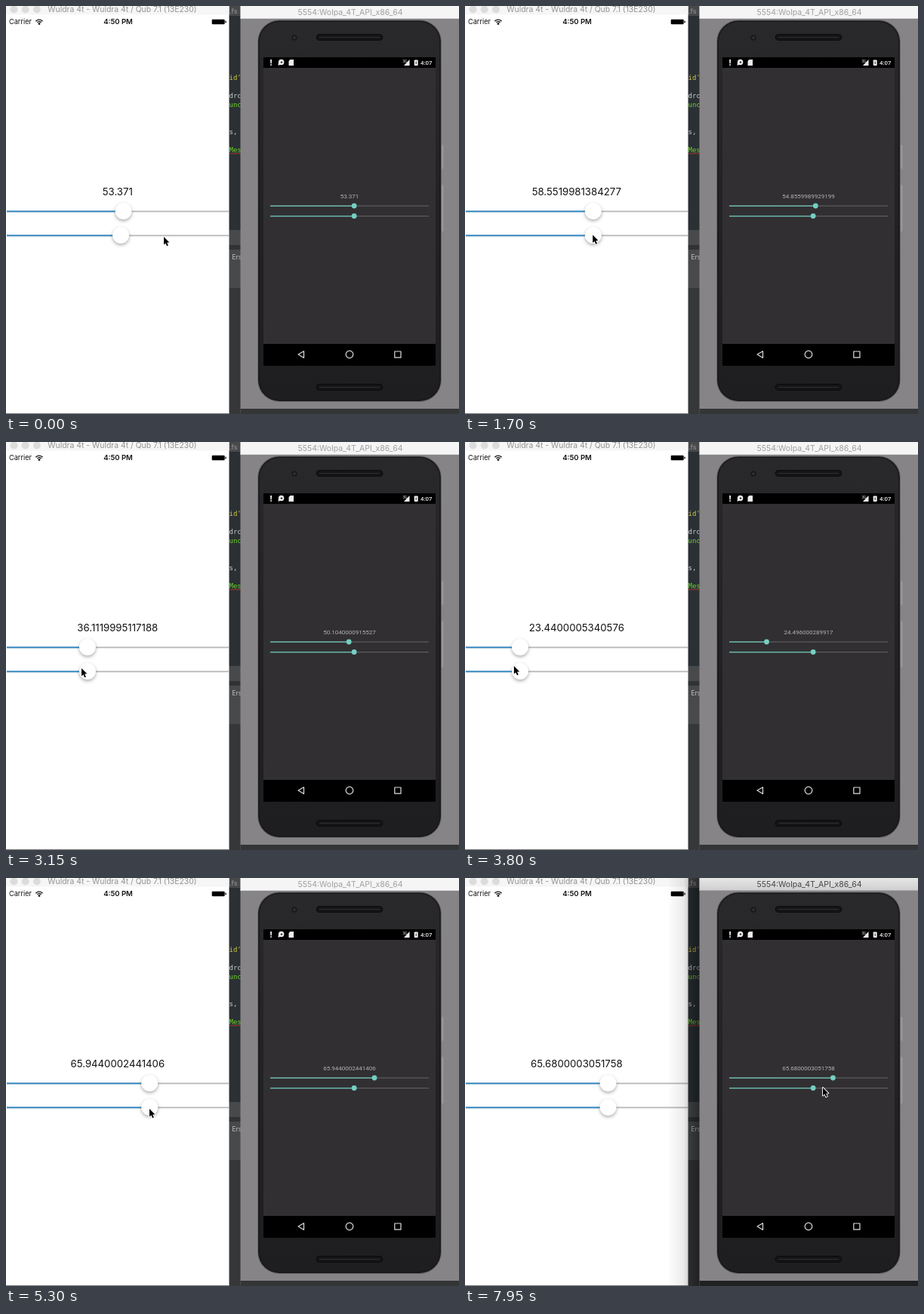
Animation of 600 by 541 pixels, one loop 8 s. Source, as an HTML page with a canvas:

```html
<!DOCTYPE html>
<html lang="en">
<head>
<meta charset="utf-8">
<title>Linked sliders</title>
<style>
html, body { margin: 0; width: 100%; height: 100%; overflow: hidden; background: #fff; }
canvas { display: block; width: 600px; height: 541px; }
</style>
</head>
<body>
<canvas id="stage" width="600" height="541"></canvas>
<script>
const ctx = document.getElementById('stage').getContext('2d');
const LOOP = 8000, STEP = 50, LAG = 134, GRAB = 1330, FOCUS = 6650;
const START = 53.371, REST = 65.68, NOTCH = 0.132;
const SANS = 'Inter, "Liberation Sans", sans-serif';
const ROBOTO = 'Roboto, sans-serif';
const MONO = '"DejaVu Sans Mono", monospace';

// Each stroke of the mouse eases everything to a new state.
const origin = { value: 52.1, x: 209, y: 306 };
const strokes = [
  { from: 0, to: 850, x: 150, y: 302 },
  { from: GRAB, to: 2427, value: 77.2, x: 225, y: 308 },
  { from: 2650, to: 3350, value: 26.6, x: 71, y: 298 },
  { from: 3350, to: 3880, value: 23.3, x: 64.5, y: 297 },
  { from: 4300, to: 5150, value: 65.944, x: 190, y: 306 },
  { from: 5800, to: 5950, value: REST },
  { from: 6000, to: 6950, x: 416, y: 278 },
  { from: 7150, to: 7950, x: 474 }
];

function ease(p) {
  return Math.sin(Math.min(1, Math.max(0, p)) * Math.PI / 2) ** 2;
}

function at(key, t) {
  return strokes.reduce((now, s) =>
    key in s ? now + (s[key] - now) * ease((t - s.from) / (s.to - s.from)) : now, origin[key]);
}

function valueAt(t) {
  if (t < GRAB) return START;
  const notches = Math.round((at('value', t) - REST) / NOTCH);
  return Math.fround(+(REST + notches * NOTCH).toFixed(3));
}

const label = v => String(Number(v.toPrecision(15)));

function rect(x, y, w, h, fill) {
  ctx.fillStyle = fill;
  ctx.fillRect(x, y, w, h);
}

function paint(fill, stroke, line = 1) {
  ctx.lineJoin = 'round';
  if (stroke) { ctx.strokeStyle = stroke; ctx.lineWidth = line; ctx.stroke(); }
  if (fill) { ctx.fillStyle = fill; ctx.fill(); }
}

function round(x, y, w, h, r, ...style) {
  ctx.beginPath();
  ctx.roundRect(x, y, w, h, r);
  paint(...style);
}

function disc(x, y, r, ...style) {
  ctx.beginPath();
  ctx.arc(x, y, r, 0, 7);
  paint(...style);
}

function poly(points, ...style) {
  ctx.beginPath();
  points.forEach(([x, y]) => ctx.lineTo(x, y));
  ctx.closePath();
  paint(...style);
}

function text(s, x, y, font, fill, align = 'left') {
  ctx.font = font;
  ctx.textAlign = align;
  ctx.fillStyle = fill;
  ctx.fillText(s, x, y);
}

function gradient(x0, y0, x1, y1, ...stops) {
  const g = ctx.createLinearGradient(x0, y0, x1, y1);
  stops.forEach((c, i) => g.addColorStop(i / (stops.length - 1), c));
  return g;
}

function lightSlider(v, y) {
  const x = 8.3 + 2.759 * v;
  rect(1, y - 0.5, 294, 1.8, '#b8b8b8');
  rect(1, y - 0.5, x - 1, 1.8, '#2b86c3');
  ctx.save();
  ctx.shadowColor = 'rgba(0,0,0,.32)';
  ctx.shadowBlur = 4;
  ctx.shadowOffsetY = 2;
  disc(x, y, 11, '#fff');
  ctx.restore();
}

function lightWindow(v, lower) {
  rect(0, 0, 295.5, 541, '#fff');
  rect(0, 0, 295.5, 11.5, '#f7f6f7');
  for (let i = 0; i < 3; i++) disc(10.5 + 15.2 * i, 4.5, 5, '#dcdcdc');
  text('Wuldra 4t - Wuldra 4t / Qub 7.1 (13E230)', 154, 8, '10.4px ' + SANS, '#929292', 'center');

  text('Carrier', 4, 24.3, '9.2px ' + SANS, '#111');
  for (let r = 3.4; r < 6; r += 2.5) {
    ctx.beginPath();
    ctx.arc(44, 24, r, -Math.PI * 0.78, -Math.PI * 0.22);
    paint(null, '#111', 1.4);
  }
  disc(44, 23.6, 1.4, '#111');
  text('4:50 PM', 148.5, 24.3, '600 9.5px ' + SANS, '#111', 'center');
  round(272.7, 17.7, 17, 6.6, 1.2, '#000');
  rect(290.4, 19.7, 1.3, 2.6, '#000');

  text(label(v), 147.8, 251, '13.2px ' + SANS, '#111', 'center');
  lightSlider(v, 272);
  lightSlider(lower, 304);
  rect(0, 540, 295.5, 1, '#777');
}

function editor() {
  rect(295, 0, 16, 541, '#2a3034');
  rect(295, 0, 16, 13, '#48494b');
  rect(295, 297, 16, 78, '#47494b');
  rect(295, 317, 16, 6, '#303234');
  rect(295, 374, 16, 167, '#363739');
  text('.fs', 296, 10, '9px ' + SANS, '#999');
  text("id'", 295.5, 98, '9px ' + MONO, '#d6c94a');
  text('drc', 295.5, 122, '9px ' + MONO, '#ccc');
  text('unc', 295.5, 134, '9px ' + MONO, '#6fd02f');
  text('s,', 295.5, 170, '9px ' + MONO, '#ccc');
  text('Mes', 295.5, 194, '9px ' + MONO, '#6fd02f');
  rect(296, 195.3, 15, 1, '#a8372d');
  text('Ers', 299.5, 335.5, '8.5px ' + SANS, '#c4c4c4');
}

function windowShadow() {
  rect(268, 0, 43, 541, gradient(268, 0, 311, 0, 'rgba(0,0,0,0)', 'rgba(0,0,0,.08)', 'rgba(0,0,0,.42)'));
}

function speaker(y) {
  round(411.5, y, 87, 7, 3.5, '#141415', '#050505', 1.5);
  rect(415, y + 3, 80, 1, '#303033');
}

function statusIcons() {
  const ink = '#eee';
  text('!', 349.5, 79, '900 11px ' + ROBOTO, ink);
  disc(364.6, 74.5, 3.7, ink);
  poly([[361, 74], [360.5, 79], [365, 77]], ink);
  disc(365, 74.6, 1.2, '#222');
  poly([[374.5, 73], [376.5, 71], [381, 71], [381, 79], [374.5, 79]], ink);
  text('3G', 525.5, 74.5, '4.5px ' + ROBOTO, ink);
  poly([[527, 79], [534.5, 79], [534.5, 71]], ink);
  round(540.7, 71.5, 5, 7.5, 0.8, ink);
  rect(542.7, 73.5, 1, 3.5, '#333');
  text('4:07', 549, 78, '500 7.8px ' + ROBOTO, ink);
}

function darkSlider(v, y) {
  const x = 347.2 + 2.135 * v;
  rect(350, y - 0.5, 210, 1.2, '#5d5c5e');
  rect(350, y - 0.6, x - 350, 1.5, '#66b5a9');
  disc(x, y, 3.4, '#75cfc1');
}

function phone(v) {
  round(575, 184, 4.5, 32, 1.5, '#98969a');
  round(575, 237, 4.5, 62, 1.5, '#98969a');
  round(334, 19.3, 242, 504.7, 28, gradient(0, 19, 0, 524, '#29282b', '#222124', '#1e1d20'), '#6a696c', 1.8);
  round(335.2, 20.5, 239.6, 502.3, 27, null, '#19191b', 1.2);
  speaker(38);
  speaker(502);
  disc(382, 42, 3.7, '#18191b');
  disc(382, 42, 1.8, '#303236');

  rect(341, 68, 228, 409, '#312f32');
  rect(341, 68, 228, 14, '#000');
  rect(341, 448, 228, 29, '#000');
  statusIcons();

  poly([[387, 462], [394.5, 457.7], [394.5, 466.5]], null, '#ddd', 1.2);
  disc(455, 462, 4.8, null, '#ddd', 1.2);
  round(514.8, 458, 8.2, 8.2, 0, null, '#ddd', 1.2);

  text(label(v), 455, 254.8, '8px ' + ROBOTO, '#b3b2b3', 'center');
  darkSlider(v, 265);
  darkSlider(START, 278.5);
}

function darkWindow(v, focused) {
  rect(310.5, 0, 290, 541, '#878487');
  rect(310.5, 0, 290, 17, focused ? gradient(0, 0, 0, 17, '#e7e6e7', '#cfcecf') : '#f6f5f6');
  rect(310.5, 16, 290, 1, focused ? '#aaa' : '#d6d6d6');
  text('5554:Wolpa_4T_API_x86_64', 456, 12, '10.5px ' + SANS, focused ? '#454545' : '#a0a0a0', 'center');
  phone(v);
  rect(310.5, 534, 290, 7, focused ? '#202123' : '#333537');
}

function cursor(x, y) {
  ctx.save();
  ctx.translate(x, y);
  poly([[0, 0], [0, 10.5], [2.4, 8.4], [4.1, 12.3], [5.9, 11.5], [4.2, 7.7], [7.3, 7.4]], '#000', '#fff', 1.8);
  ctx.restore();
}

function draw(t) {
  const v = valueAt(t), focused = t >= FOCUS;
  editor();
  lightWindow(v, t < GRAB ? origin.value : v);
  if (focused) windowShadow();
  darkWindow(valueAt(t - LAG), focused);
  cursor(at('x', t), at('y', t));
}

const begin = performance.now();
function tick() {
  const t = (performance.now() - begin) % LOOP;
  draw(Math.floor(t / STEP) * STEP);
  requestAnimationFrame(tick);
}
tick();
</script>
</body>
</html>
```
